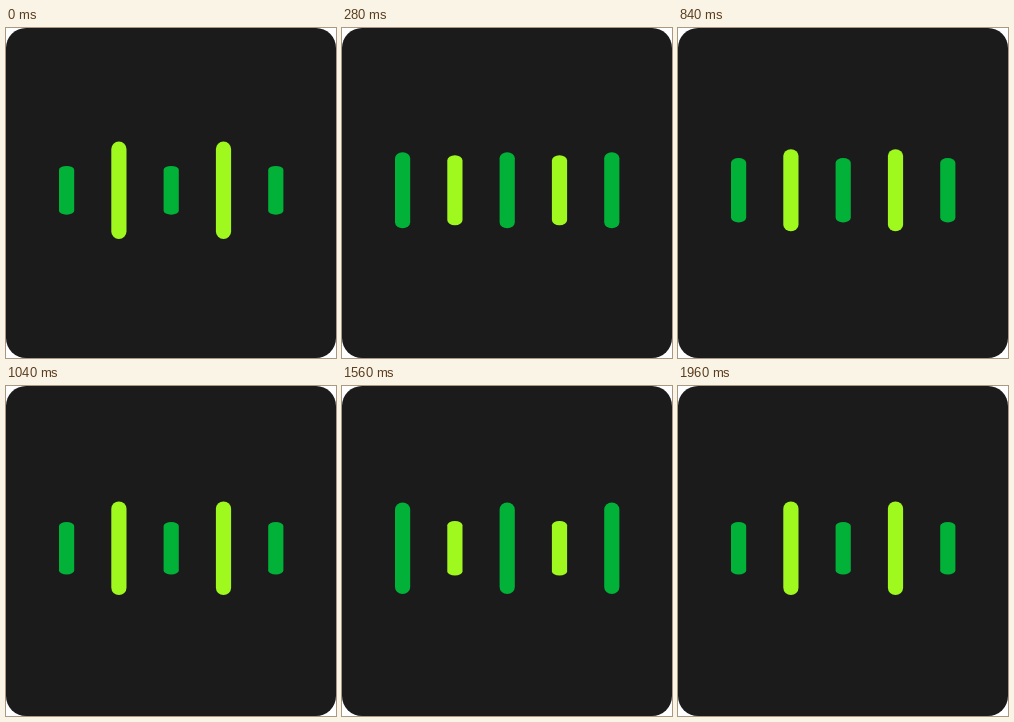
These frames come from a looping animation (330x330 px, 2000 ms). An HTML page:

```html
<!DOCTYPE html>
<html lang="en">
<head>
<meta charset="utf-8">
<title>Pulsing bars</title>
<style>
  html, body { margin: 0; width: 100%; height: 100%; overflow: hidden; background: #fff; }
  svg { display: block; width: 100vw; height: 100vh; }
</style>
</head>
<body>
<svg viewBox="0 0 330 330">
  <rect width="330" height="330" rx="20" fill="#1b1b1b"/>
  <g id="bars"></g>
</svg>
<script>
const PERIOD = 1000, STEP = 40;
const LEFT = 53, GAP = 52.3, WIDTH = 15.2, HEIGHT = 97.5, MIDDLE = 162.25;
const COLORS = ['#02b137', '#a0f91e'];
const group = document.getElementById('bars');

const bars = Array.from({ length: 5 }, (_, i) => {
  const bar = document.createElementNS('http://www.w3.org/2000/svg', 'rect');
  const attrs = {
    x: LEFT + i * GAP, y: -HEIGHT / 2,
    width: WIDTH, height: HEIGHT, rx: WIDTH / 2,
    fill: COLORS[i % 2]
  };
  for (const name in attrs) bar.setAttribute(name, attrs[name]);
  group.append(bar);
  return bar;
});

// Triangle wave: 0 at the ends of the period, 1 halfway.
const wave = t => 1 - Math.abs(1 - 2 * (t % PERIOD) / PERIOD);

function draw(time) {
  const w = wave(Math.floor(time / STEP) * STEP);
  bars.forEach((bar, i) => {
    const scale = 0.5 + 0.5 * (i % 2 ? 1 - w : w);
    bar.setAttribute('transform', `translate(0 ${MIDDLE}) scale(1 ${scale})`);
  });
}

const start = performance.now();
function tick() {
  draw(Math.max(0, performance.now() - start));
  requestAnimationFrame(tick);
}
tick();
</script>
</body>
</html>
```
